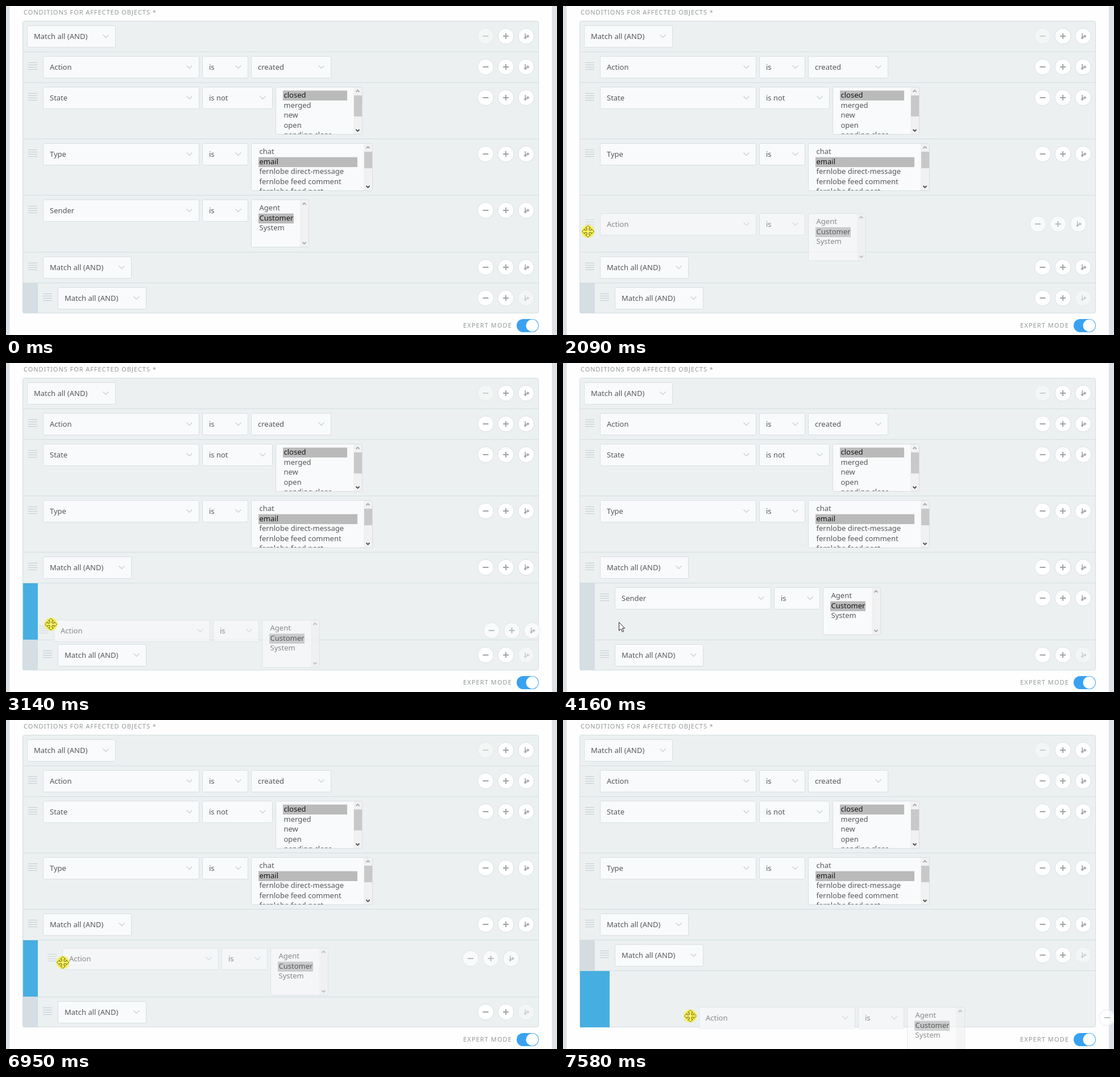
Write an HTML page that moves like this. It is 969 by 578 pixels and loops after 8000 ms.

```html
<!DOCTYPE html>
<html lang="en">
<head>
<meta charset="utf-8">
<title>Condition editor</title>
<style>
  html, body { margin: 0; width: 100%; height: 100%; overflow: hidden; background: #dce2e6; }
  svg { display: block; width: 969px; height: 578px; }
  text { font: 13px "Noto Sans", "Open Sans", sans-serif; fill: #555859; white-space: pre; }
  .caps { font-size: 11px; fill: #929799; }
  .on { fill: #161616; }
  .box { fill: #f9fafb; stroke: #d7dfe3; }
  .chev { fill: none; stroke: #c6cdd1; stroke-width: 1.2; }
  .grip { fill: none; stroke: #c3cbcf; }
  .btn { fill: #fff; stroke: #d8dfe3; }
  .icon { fill: none; stroke: #a0a3a5; stroke-width: 2; }
  .line { stroke: #d3dee2; }
</style>
</head>
<body>
<svg id="stage" viewBox="0 0 969 578" xmlns="http://www.w3.org/2000/svg"></svg>
<script>
const LOOP = 8000, INDENT = 26;
const stage = document.getElementById('stage');

const rect = (x, y, w, h, fill) => `<rect x="${x}" y="${y}" width="${w}" height="${h}" fill="${fill}"/>`;
const label = (x, y, s, attrs = '') => `<text x="${x}" y="${y}" ${attrs}>${s}</text>`;
const group = (x, y, body, attrs = '') => `<g transform="translate(${x} ${y})" ${attrs}>${body}</g>`;
const box = (x, y, w, h) =>
  `<rect class="box" x="${x + .5}" y="${y + .5}" width="${w - 1}" height="${h - 1}" rx="2"/>`;

// All row parts use coordinates relative to the top of the row.
const select = (x, w, s) => box(x, 8, w, 39) + label(x + 12, 32, s) +
  `<path class="chev" d="M${x + w - 22.5} 24.5l5 5 5-5"/>`;

const scrollArrow = (x, y, dir, color) =>
  `<path d="M${x - 3} ${y + 1.5 * dir}l3 ${-3 * dir} 3 ${3 * dir}" fill="none" stroke="${color}" stroke-width="1.8"/>`;

function list(x, w, id, items, chosen, thumb) {
  let s = box(x, 8, w, 84) + `<clipPath id="${id}"><rect x="${x}" y="9" width="${w}" height="82"/></clipPath>`;
  s += `<g clip-path="url(#${id})">`;
  items.forEach((item, i) => {
    const y = Math.ceil(i * 17.4);
    if (i === chosen) s += rect(x + 13, y + 14.6, w - 40, 17.4, '#bababa');
    s += label(x + 14.5, y + 27, item, i === chosen ? 'class="on"' : '');
  });
  s += '</g>' + rect(x + w - 16, 9, 15, 82, '#f1f1f1');
  if (thumb) s += rect(x + w - 15, 23, 14, thumb, '#c8c8c8');
  const mid = x + w - 8.5;
  return s + scrollArrow(mid, 15.5, 1, '#a8a8a8') + scrollArrow(mid, 84.5, -1, thumb ? '#4c4c4c' : '#a8a8a8');
}

const grip = x => `<path class="grip" d="M${x} 19.5h16m-16 4h16m-16 4h16m-16 4h16"/>`;

const icons = [
  '<path class="icon" d="M-5 0H5"/>',
  '<path class="icon" d="M-5 0H5M0-5V5"/>',
  '<path class="icon" style="stroke-width:1.6" d="M-1.5-5V4M-1.5 3Q-1.5 0 3 0"/>' +
  '<path fill="#a0a3a5" d="M2-3L6 0 2 3zM-4.5 2H1.5L-1.5 5.5z"/>'
];
const buttons = (off, dx = 0) => icons.map((icon, i) =>
  group(843.5 + dx + 35.6 * i, 27, `<circle class="btn" r="14"/>${icon}`, i === off ? 'opacity=".42"' : '')).join('');

const brand = 'fernlobe';
const field = (name, op, opWidth) => grip(39) + select(65, 275, name) + select(345, opWidth, op);
const people = id => list(431, 102, id, ['Agent', 'Customer', 'System'], 1);

const senderRow = (name, id) => field(name, 'is', 81) + people(id);
const matchRow = grip(39) + select(65, 156, 'Match all (AND)');

const fixedRows =
  group(0, 26, select(37, 156, 'Match all (AND)') + buttons(0)) +
  group(0, 80, field('Action', 'is', 81) + select(431, 141, 'created') + buttons()) +
  group(0, 134, field('State', 'is not', 124) + buttons() +
    list(474, 153, 'states', ['closed', 'merged', 'new', 'open', 'pending close'], 0, 37)) +
  group(0, 233, field('Type', 'is', 81) + buttons() +
    list(431, 214, 'types', ['chat', 'email', brand + ' direct-message', brand + ' feed comment', brand + ' feed post'], 1, 29));

const backdrop = rect(0, 0, 969, 578, '#dce2e6') + rect(6.5, 0, 953.5, 578, '#fefefe') +
  label(31, 15, 'CONDITIONS FOR AFFECTED OBJECTS *', 'class="caps" letter-spacing=".94"') +
  '<rect x="29.5" y="26.5" width="907" height="513" rx="3" fill="#ecf0f1" stroke="#d3dee2"/>' +
  label(804, 565, 'EXPERT MODE', 'class="caps" letter-spacing="1.1"') +
  '<rect x="898" y="550" width="39" height="23" rx="11.5" fill="#39a2f0"/>' +
  '<circle cx="925.3" cy="561.5" r="10.7" fill="#fff"/>';

const rule = (y, x = 30) => `<path class="line" d="M${x} ${y + .5}H936"/>`;
const baseRules = [80, 134, 233, 332].map(y => rule(y)).join('');

const strip = (y, h, color, depth = 1) => rect(30, y, INDENT * depth, h, color);
const GREY = '#d4dee4', BLUE = '#47aee1';

// Lower part of the panel for each arrangement of the movable row.
const outer = y => group(0, y, matchRow + buttons());
const inner = y => group(INDENT, y, matchRow) + group(0, y, buttons(2));
const layouts = {
  first: show => rule(432) + rule(486) + strip(487, 53, GREY) +
    (show ? group(0, 332, senderRow('Sender', 'p1') + buttons()) : '') + outer(432) + inner(486),
  second: () => rule(386) + rule(486) + strip(487, 53, GREY) + outer(332) + inner(486),
  nested: show => rule(386) + strip(387, 99, show ? GREY : BLUE) + strip(486, 54, GREY) + rule(486, 56) +
    (show ? group(INDENT, 386, senderRow('Sender', 'p1')) + group(0, 386, buttons()) : '') + outer(332) + inner(486),
  deep: () => rule(386) + strip(387, 53, '#d4dcdf') + rule(440) + strip(441, 99, BLUE, 2) + outer(332) + inner(386)
};

const ghost = (dx, dy, level, top) =>
  group(dx + INDENT * level, top + dy, senderRow('Action', 'p2') + buttons(-1, -8.5 - 2 * INDENT * level), 'opacity=".68"');

const arrow = '<path d="M.5.5V15.2L3.9 12 6.3 17.4 8.7 16.4 6.4 11H10.6Z" fill="#fff" stroke="#222"/>';
const movePath = 'M0-10.5L4.5-6H2V-2H6V-4.5L10.5 0 6 4.5V2H2V6H4.5L0 10.5-4.5 6H-2V2H-6V4.5L-10.5 0-6-4.5V-2H-2V-6H-4.5Z';
const mover = held => (held ? '<circle r="11.3" fill="#f5ef5a"/>' : '') +
  `<path d="${movePath}" fill="${held ? '#f7f266' : '#fff'}" stroke="${held ? '#6b6712' : '#222'}"/>`;

const smooth = p => p * p * (3 - 2 * p);
const mix = (a, b, p) => a + (b - a) * p;

// Pointer moves in discrete ticks; returns positions after each one.
const glide = (n, x0, y0, x1, y1) => Array.from({ length: n }, (_, i) => {
  const p = smooth((i + 1) / n);
  return [Math.round(mix(x0, x1, p)), Math.round(mix(y0, y1, p))];
});

const moves = {
  enter: { t0: 500, t1: 780, from: [-8, 360], path: glide(5, -8, 360, 44, 351) },
  down: { t0: 1930, t1: 2370, from: [44, 351], path: glide(7, 44, 351, 44, 465) },
  right: { t0: 3000, t1: 3280, from: [44, 465], path: glide(5, 44, 465, 98, 455) },
  back: { t0: 5300, t1: 5980, from: [98, 455], path: glide(10, 98, 455, 76, 412) },
  away: {
    t0: 6880, t1: 7580, from: [76, 412],
    path: [[8, 4], [24, 14], [46, 28], [68, 43], [86, 56], [97, 63], [110, 74], [123, 86], [135, 97], [144, 105], [148, 108]]
      .map(([x, y]) => [76 + x, 412 + y])
  }
};

// The dragged row trails the pointer by one tick until it rests.
function at(move, t) {
  const { t0, t1, from, path } = move, last = path.length - 1;
  if (t < t0) return { pos: from, trail: from };
  const k = Math.min(last, Math.floor((t - t0) / ((t1 - t0) / last) + 1e-6));
  return { pos: path[k], trail: k === last ? path[k] : k ? path[k - 1] : from };
}

function scene(t) {
  let layout = 'first', show = true, drag = '', held = false, pointer = arrow, pos = null;
  if (t >= 500 && t < 1930) {
    pos = at(moves.enter, t).pos;
    held = t >= 1660;
    if (pos[0] > 38) pointer = mover(held);
  } else if (t >= 1930 && t < 4160) {
    const step = at(t < 3000 ? moves.down : moves.right, t);
    pos = step.pos;
    show = false;
    layout = pos[0] > 68 ? 'nested' : pos[1] > 432 ? 'second' : 'first';
    drag = ghost(step.trail[0] - 44, step.trail[1] - 350, 0, 332);
    pointer = mover(true);
  } else if (t >= 4160 && t < 6880) {
    layout = 'nested';
    pos = at(moves.back, t).pos;
    held = t >= 6550;
    if (Math.abs(pos[0] - 73) < 9 && Math.abs(pos[1] - 411) < 9) pointer = mover(held);
  } else if (t >= 6880) {
    const step = at(moves.away, t);
    pos = step.pos;
    show = false;
    layout = pos[1] > 486 ? 'deep' : 'nested';
    drag = ghost(step.trail[0] - 76, step.trail[1] - 410, 1, 386);
    pointer = mover(true);
  }
  return backdrop + baseRules + fixedRows + layouts[layout](show) + drag +
    (pos ? group(pos[0], pos[1], pointer) : '');
}

let shown = '';
function render(t) {
  const next = scene(t);
  if (next !== shown) stage.innerHTML = shown = next;
}

const start = performance.now();
function frame() {
  render((performance.now() - start) % LOOP);
  requestAnimationFrame(frame);
}
render(0);
requestAnimationFrame(frame);
</script>
</body>
</html>
```
